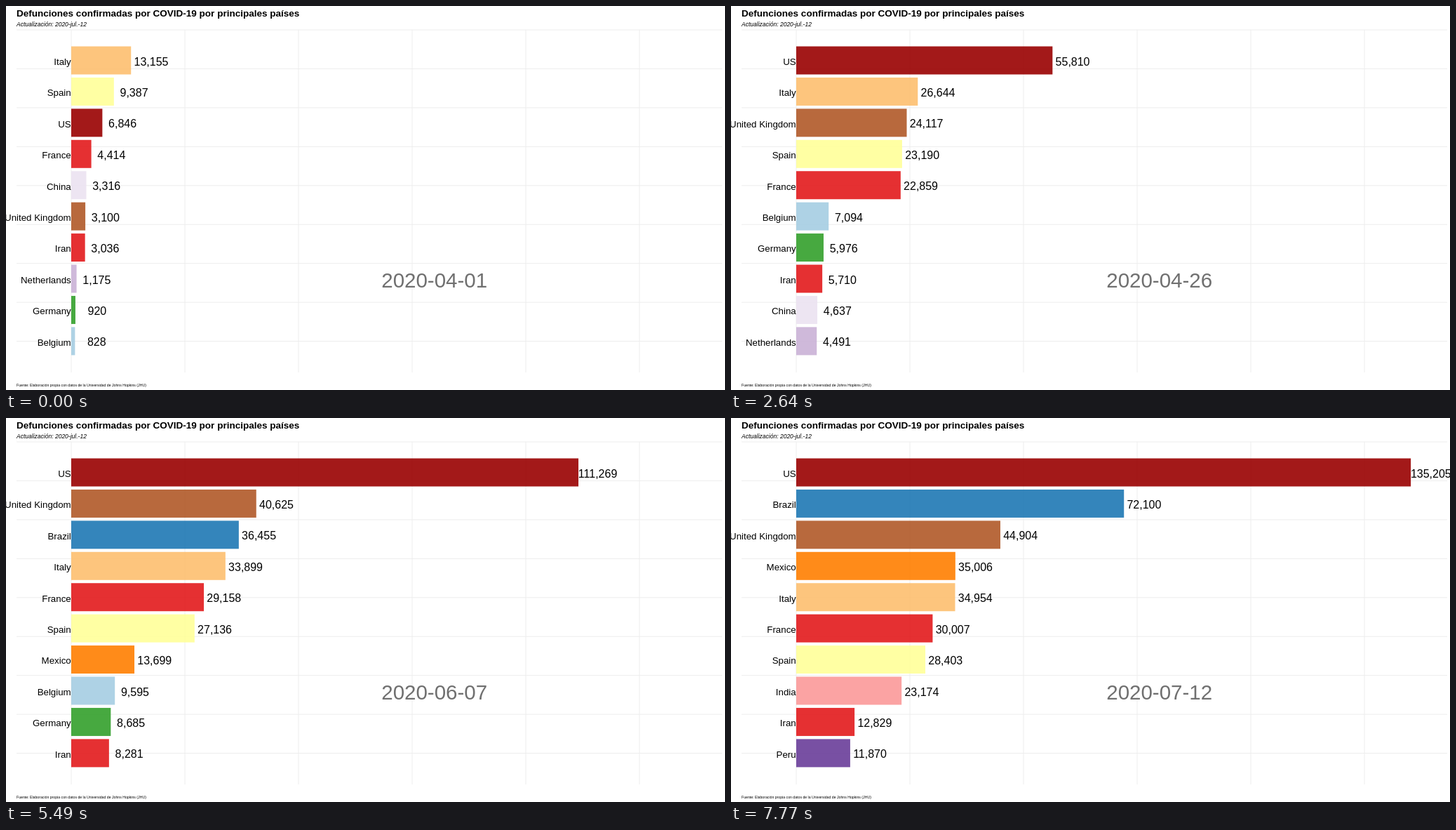
These frames come from a looping animation (1025 px wide and 547 px high, 9000 ms). An HTML page:

```html
<!DOCTYPE html>
<html lang="es">
<head>
<meta charset="utf-8">
<title>Defunciones confirmadas por COVID-19</title>
<style>
  html, body { margin: 0; width: 100%; height: 100%; overflow: hidden; background: #fff; }
  svg { display: block; width: 1025px; height: 547px; font-family: "Liberation Sans", Arial, sans-serif; }
  .grid path { stroke: #ededed; stroke-width: 1; fill: none; }
  .bars { fill-opacity: .9; }
  .names { font-size: 13.3px; text-anchor: end; }
  .values { font-size: 16px; }
</style>
</head>
<body>
<svg viewBox="0 0 1025 547">
  <g class="grid"></g>
  <text x="15" y="15" font-size="13.53" font-weight="bold">Defunciones confirmadas por COVID-19 por principales países</text>
  <text x="15" y="29" font-size="8.53" font-style="italic">Actualización: 2020-jul.-12</text>
  <text x="15" y="542" font-size="5.18">Fuente: Elaboración propia con datos de la Universidad de Johns Hopkins (JHU)</text>
  <g class="bars"></g>
  <g class="names"></g>
  <g class="values"></g>
  <text class="date" x="610.7" y="400.5" font-size="29.5" text-anchor="middle" fill="#707070"></text>
</svg>
<script>
const LOOP = 9000, STEP = 30, START = 930, LAST_STEP = 229, LAST_DAY = 102, TOP = 10;
const X0 = 93, SCALE = 162 / 25000, Y0 = 57.5, ROW = 44.43, BAR = 40;

// Totals on these days; the optional object adds days where a curve bends.
const DAYS = [0, 8, 25, 51, 67, 79, 102];
const COUNTRIES = [
  ['US', '#990000', [6846, 20638, 55810, 97025, 111269, 119739, 135205]],
  ['Italy', '#fdbf6f', [13155, 18279, 26644, 32616, 33899, 34561, 34954]],
  ['Spain', '#ffff99', [9387, 15447, 23190, 28628, 27136, 28315, 28403],
    { 39: 26621, 50: 27940, 53: 28752, 54: 26834, 55: 27117, 78: 27136 }],
  ['France', '#e31a1c', [4414, 12228, 22859, 28292, 29158, 29620, 30007], { 39: 26383, 50: 28218 }],
  ['United Kingdom', '#b15928', [3100, 9623, 24117, 36475, 40625, 42546, 44904]],
  ['China', '#ece3f1', [3316, 3339, 4637, 4638, 4638, 4639, 4641], { 15: 3346, 16: 4636 }],
  ['Iran', '#e31a1c', [3036, 4110, 5710, 7300, 8281, 9392, 12829]],
  ['Netherlands', '#cab2d6', [1175, 2403, 4491, 5806, 6031, 6105, 6148], { 43: 5608 }],
  ['Germany', '#33a02c', [920, 2607, 5976, 8228, 8685, 8895, 9071]],
  ['Belgium', '#a6cee3', [828, 2523, 7094, 9212, 9595, 9695, 9782], { 7: 2240, 16: 5163 }],
  ['Brazil', '#1f78b4', [240, 950, 4286, 21048, 36455, 48954, 72100]],
  ['Mexico', '#ff7f00', [37, 194, 1351, 6989, 13699, 20394, 35006]],
  ['India', '#fb9a99', [58, 226, 881, 3726, 7207, 12948, 23174], { 72: 8884, 75: 9900, 76: 11903 }],
  ['Peru', '#6a3d9a', [47, 138, 728, 3244, 5465, 7660, 11870]],
  ['Canada', '#b2df8a', [109, 503, 2663, 6380, 7877, 8410, 8829], { 43: 5592 }]
].map(([name, color, totals, bends = {}]) => {
  const known = { ...bends };
  DAYS.forEach((d, i) => known[d] = totals[i]);
  return { name, color, daily: dailySeries(known) };
});

// Monotone cubic curve through the known days, rounded to whole counts.
function dailySeries(known) {
  const xs = Object.keys(known).map(Number).sort((a, b) => a - b);
  const ys = xs.map(x => known[x]);
  const secant = xs.slice(1).map((x, i) => (ys[i + 1] - ys[i]) / (x - xs[i]));
  const slope = xs.map((_, i) => {
    const a = secant[i - 1] ?? secant[i], b = secant[i] ?? a;
    return a * b <= 0 ? 0 : 2 * a * b / (a + b);
  });
  return Array.from({ length: LAST_DAY + 1 }, (_, d) => {
    let i = 0;
    while (i < xs.length - 2 && d >= xs[i + 1]) i++;
    const h = xs[i + 1] - xs[i], u = (d - xs[i]) / h, v = 1 - u;
    return Math.round(ys[i] * v * v * (1 + 2 * u) + ys[i + 1] * u * u * (3 - 2 * u)
      + h * u * v * (slope[i] * v - slope[i + 1] * u));
  });
}

const rankings = Array.from({ length: LAST_DAY + 1 }, (_, d) =>
  [...COUNTRIES].sort((a, b) => b.daily[d] - a.daily[d]).slice(0, TOP));

const $ = selector => document.querySelector(selector);
function add(parent, tag, attrs = {}) {
  const node = document.createElementNS($('svg').namespaceURI, tag);
  set(node, attrs);
  return parent.appendChild(node);
}
function set(node, attrs) {
  for (const key in attrs) node.setAttribute(key, attrs[key]);
}

for (let i = 0; i < 9; i++) add($('.grid'), 'path', { d: `M15 ${34 + i * 55.45}H1021` });
for (let i = 0; i < 6; i++) add($('.grid'), 'path', { d: `M${X0 + i * 162} 34V522` });

const rows = Array.from({ length: TOP }, () => ({
  bar: add($('.bars'), 'rect', { x: X0, height: BAR }),
  name: add($('.names'), 'text', { x: X0 - .3 }),
  value: add($('.values'), 'text')
}));

function dayAt(time) {
  const step = time < START ? 0 : Math.min(LAST_STEP, Math.floor((time - START) / STEP) + 1);
  const day = step < 120 ? step * .4365 : 52.38 + (step - 120) * (LAST_DAY - 52.38) / (LAST_STEP - 120);
  return Math.min(LAST_DAY, day);
}

function draw(time) {
  const day = dayAt(time), from = Math.floor(day), to = Math.min(from + 1, LAST_DAY);
  const mix = day - from, near = mix < .5 ? from : to;
  const lerp = (a, b) => a + (b - a) * mix;
  const shown = rankings[near].map(country => {
    const a = rankings[from].indexOf(country), b = rankings[to].indexOf(country);
    return { country, a: a < 0 ? b : a, b: b < 0 ? a : b };
  }).sort((p, q) => p.a - q.a);

  shown.forEach(({ country, a, b }, i) => {
    const { bar, name, value } = rows[i];
    const y = Y0 + ROW * lerp(a, b);
    const width = SCALE * lerp(country.daily[from], country.daily[to]);
    const label = country.daily[near].toLocaleString('en-US');
    const padding = (7 - label.length) * 4.45;
    set(bar, { y, width, fill: country.color });
    set(name, { y: y + 26.3 });
    set(value, { x: X0 + width + padding - .2, y: y + 27 });
    name.textContent = country.name;
    value.textContent = label;
  });
  $('.date').textContent = new Date(Date.UTC(2020, 3, 1 + near)).toISOString().slice(0, 10);
}

const begin = performance.now();
function tick() {
  draw((performance.now() - begin) % LOOP);
  requestAnimationFrame(tick);
}
tick();
</script>
</body>
</html>
```
